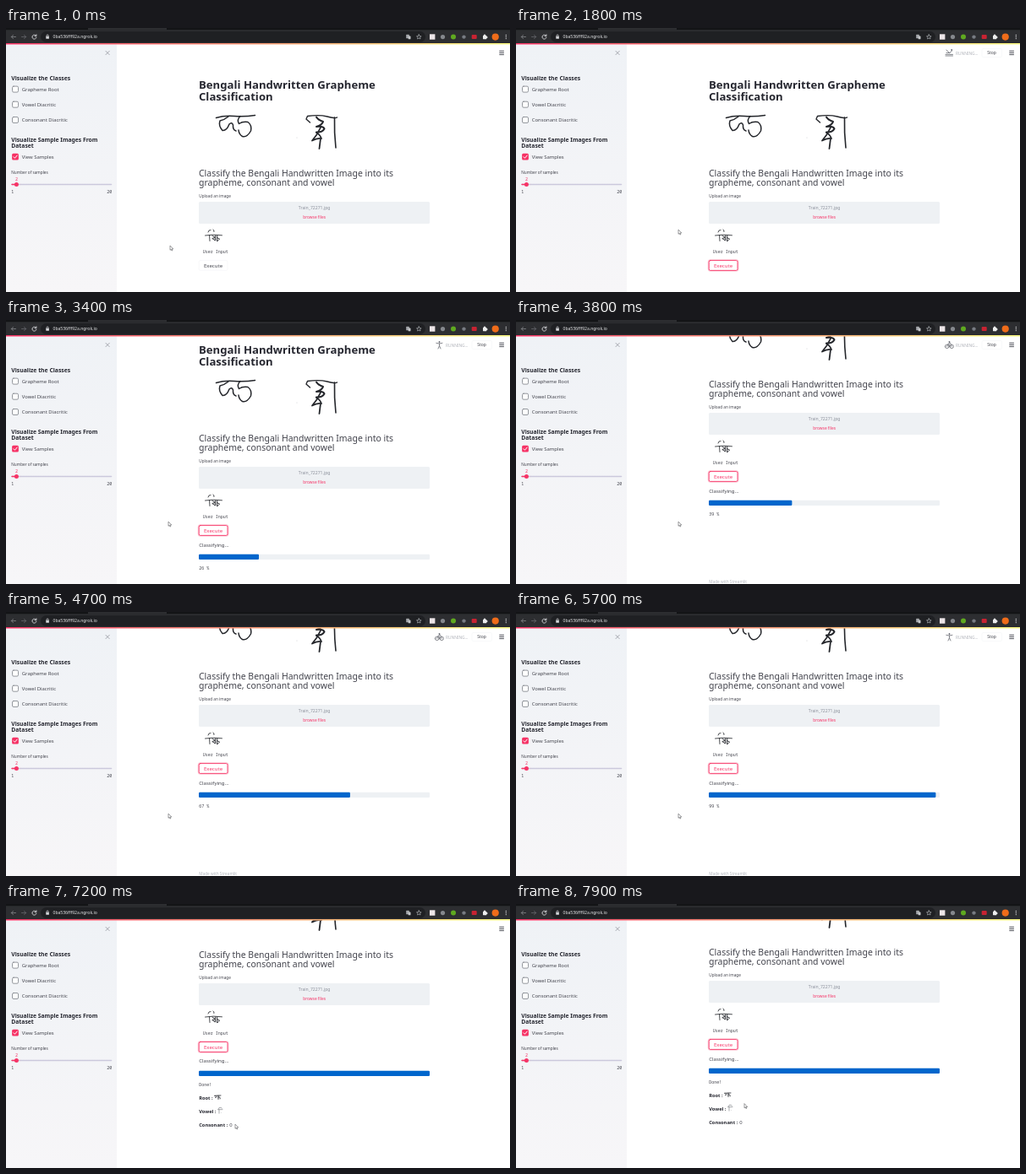
An HTML page with a canvas for the animation above (8000 ms loop, 596x313 px).

```html
<!DOCTYPE html>
<html lang="en">
<head>
<meta charset="utf-8">
<title>Grapheme classification demo</title>
<style>
  html, body { margin: 0; width: 100%; height: 100%; overflow: hidden; background: #fff; }
  canvas { display: block; width: 596px; height: 313px; }
</style>
</head>
<body>
<canvas id="stage"></canvas>
<script>
const W = 596, H = 313, LOOP = 8000;
const INK = '#262730', SOFT = '#43444d', PINK = '#f63366', GREY = '#8c919c', PALE = '#eef1f4', BLUE = '#0066cc';
const SANS = '"Noto Sans", sans-serif', MONO = '"Noto Sans Mono", monospace';

const canvas = document.getElementById('stage');
const ctx = canvas.getContext('2d');
const dpr = window.devicePixelRatio || 1;
canvas.width = W * dpr;
canvas.height = H * dpr;

// Keyframes are [time, value] pairs
const SCROLL = [[3100, 0], [3300, 32], [3440, 32], [3600, 66], [3780, 96],
  [6950, 96], [7080, 106], [7200, 112], [7400, 115]];
const MOUSE_X = [[250, 194], [1000, 249], [1350, 249], [1750, 192],
  [6350, 192], [6750, 271], [7250, 271], [7800, 270]];
const MOUSE_Y = [[250, 258.5], [1000, 281], [1350, 281], [1750, 239.5],
  [6350, 239.5], [6750, 261.5], [7250, 261.5], [7800, 237]];
const FILL = [[2600, 0], [3400, .26], [3800, .36], [5700, .983], [5800, 1]];

function track(keys, t) {
  if (t <= keys[0][0]) return keys[0][1];
  for (let i = 1; i < keys.length; i++) {
    const [t0, a] = keys[i - 1], [t1, b] = keys[i];
    if (t < t1) return a + (b - a) * (t - t0) / (t1 - t0);
  }
  return keys[keys.length - 1][1];
}

function text(str, x, y, size, color = INK, weight = 400, family = SANS, align = 'left') {
  ctx.font = `${weight} ${size}px ${family}`;
  ctx.fillStyle = color;
  ctx.textAlign = align;
  ctx.fillText(str, x, y);
}

function rect(x, y, w, h, color, r = 0) {
  ctx.fillStyle = color;
  ctx.beginPath();
  ctx.roundRect(x, y, w, h, r);
  ctx.fill();
}

function outline(x, y, w, h, color, r, width = 1) {
  ctx.strokeStyle = color;
  ctx.lineWidth = width;
  ctx.beginPath();
  ctx.roundRect(x, y, w, h, r);
  ctx.stroke();
}

function dot(x, y, r, color) {
  ctx.fillStyle = color;
  ctx.beginPath();
  ctx.arc(x, y, r, 0, 7);
  ctx.fill();
}

function stroke(d, color, width = 1) {
  ctx.strokeStyle = color;
  ctx.lineWidth = width;
  ctx.lineCap = ctx.lineJoin = 'round';
  ctx.stroke(new Path2D(d));
}

function browser() {
  rect(0, 0, W, 18, '#2d2e31');
  rect(0, 0, W, 2.2, '#131416');
  rect(97, 0, 93, 2.2, '#2d2e31');
  rect(41, 4, 455, 13, '#1f2023', 6.5);
  stroke('M11.5 10.5H6.5M8.5 8.3L6.3 10.5L8.5 12.7', '#85878b', .8);
  stroke('M18.5 10.5H23.5M21.5 8.3L23.7 10.5L21.5 12.7', '#66686c', .8);
  stroke('M35.4 9A2.5 2.5 0 1 0 35.9 11.3M35.9 7.8V9.7H34', '#dcdde0', .9);
  rect(47.3, 9.8, 3.6, 3, '#d4d5d8', .4);
  stroke('M48 9.8V9A1.1 1.1 0 0 1 50.2 9V9.8', '#d4d5d8', .7);
  text('0ba536fff92a.ngrok.io', 55.5, 12.4, 5.05, '#e4e5e7');

  rect(473.2, 7.8, 3.6, 4.4, '#a3a5a9', .5);
  rect(475.7, 9.4, 2.8, 3.8, '#c4c6c9', .5);
  stroke('M488.3 7.7L489.1 9.6L491.1 9.8L489.6 11.1L490 13L488.3 12L486.6 13L487 11.1L485.5 9.8L487.5 9.6Z', '#c2c4c8', .6);
  rect(501, 7.3, 6.4, 6.4, '#ece5e7');
  dot(516.5, 10.6, 2.6, '#85888d');
  dot(529, 10.6, 3, '#5fa920');
  dot(541.5, 10.6, 2.2, '#777b82');
  rect(550.7, 8, 6, 5, '#c82332', 1);
  rect(564, 8.8, 4.4, 4.4, '#eceded', .6);
  dot(566, 8.5, 1.1, '#eceded');
  dot(568.5, 11, 1.1, '#eceded');
  dot(578.7, 10.6, 4.1, '#ef6c1a');
  for (const y of [8.4, 10.5, 12.6]) dot(591.3, y, .65, '#d8d9dc');

  const g = ctx.createLinearGradient(0, 0, W, 0);
  g.addColorStop(0, PINK);
  g.addColorStop(1, '#fffd80');
  rect(0, 18, W, 1.6, g);
}

function checkbox(label, y, on) {
  if (on) {
    rect(7.1, y - 3.9, 7.8, 7.8, PINK, 1.5);
    stroke(`M9 ${y + .1}L10.5 ${y + 1.6}L13.2 ${y - 1.7}`, '#fff', 1);
  } else {
    rect(7.5, y - 3.5, 7, 7, '#fff', 1.5);
    outline(7.5, y - 3.5, 7, 7, '#7d8088', 1.5, .8);
  }
  text(label, 18.8, y + 2.2, 5.9, SOFT);
}

function sidebar() {
  const g = ctx.createLinearGradient(0, 18, 0, H);
  g.addColorStop(0, '#eff2f6');
  g.addColorStop(1, '#f7f6f8');
  rect(0, 18, 131, H - 18, g);
  stroke('M118 27.4L122.2 31.6M122.2 27.4L118 31.6', '#92959d', .8);
  text('Visualize the Classes', 6.3, 62, 6.84, INK, 700);
  checkbox('Grapheme Root', 72.6);
  checkbox('Vowel Diacritic', 90.7);
  checkbox('Consonant Diacritic', 109);
  text('Visualize Sample Images From', 6.3, 135, 6.75, INK, 700);
  text('Dataset', 6.3, 142.2, 6.75, INK, 700);
  checkbox('View Samples', 152.7, true);
  text('Number of samples', 6.3, 173.2, 4.7, SOFT);
  text('2', 12.4, 180.5, 5, PINK, 400, MONO, 'center');
  rect(6.3, 184.7, 119, 1.5, '#cbc8dc', .7);
  rect(6.3, 184.7, 6.2, 1.5, PINK, .7);
  dot(12.4, 185.5, 2.5, PINK);
  text('1', 6.2, 195.6, 5, SOFT, 400, MONO);
  text('20', 125.2, 195.6, 5, SOFT, 400, MONO, 'right');
}

// Handwritten characters
function samples() {
  const ink = '#24262b';
  stroke('M248.5 106.5Q258 103.5 270 104.5T294.5 103.5', ink, 1.5);
  stroke('M263 105Q258 109 253 110Q251 116 256 121.5Q261 122 264 114Q267 111 268.5 115Q268 121 272 122', ink, 1.5);
  stroke('M277 104.5Q272.5 109 275.5 113.5Q280 110.5 286 111.5Q291 115 289.5 122Q285 130 279.5 128.5Q275.5 126 275 121', ink, 1.5);
  stroke('M359.5 112L355 108L356.5 104.5Q370 102.5 380 105T391.5 106', ink, 1.4);
  stroke('M388.5 106Q388 124 390 142', ink, 1.6);
  stroke('M367 105.5Q369 109 375 111Q374 115 367 117Q375 116 376.5 119.5Q374 124 367 123.5', ink, 2);
  stroke('M372 118Q368 127 362 133.5Q368 130 373 131Q371 126 367 124M372 131L370.5 143', ink, 1.8);
  dot(344, 130, .5, '#c4c6ca');
}

function inputGlyph() {
  const ink = '#35373c';
  stroke('M235.5 246Q245 244.3 255.5 245.8', ink, .9);
  stroke('M240.5 245.5L241 252.5M239 242Q239.5 239 242 239.5M245 239Q246.5 239.5 246 241.5', ink, .9);
  stroke('M244 246L247.3 248.5L243.8 249.5L247.5 252V246M249.5 246V252.5M249.5 248.5L252.5 250L250 252.8', ink, 1);
}

function button(hot, focus) {
  if (focus) outline(227.9, 275.4, 34.4, 12.2, 'rgba(246,51,102,.25)', 2, 2.4);
  rect(228.2, 275.6, 33.8, 11.8, '#fff', 1.6);
  outline(228.2, 275.6, 33.8, 11.8, hot ? PINK : '#f3f4f6', 1.6, hot ? .9 : .6);
  text('Execute', 245, 283.6, 6.05, hot ? PINK : SOFT, 400, SANS, 'center');
}

function results() {
  text('Done!', 228.2, 328.2, 5, SOFT, 400, MONO);
  text('Root :', 228.2, 343.7, 5.75, INK, 700);
  stroke('M246.5 339.3L254 339M248 339.5Q250 342 247.5 341.5M251 339.2V343.5M251 341Q254 340.5 253.2 343', '#33353a', .9);
  text('Vowel :', 228.2, 359.9, 5.75, INK, 700);
  stroke('M250.5 355.7H256M252 355.7V360.2M251.3 355Q251.5 352.5 254 353.3L255.3 354.2', '#85878c', .7);
  dot(254.5, 359.3, .4, '#a0a2a7');
  text('Consonant :', 228.2, 376.2, 5.75, INK, 700);
  text('0', 264.3, 376.2, 5.9, SOFT);
}

function page(t) {
  ctx.save();
  ctx.beginPath();
  ctx.rect(131, 18, W - 131, H - 18);
  ctx.clip();
  ctx.translate(0, -track(SCROLL, t));
  text('Bengali Handwritten Grapheme', 228, 71.7, 13.15, INK, 700);
  text('Classification', 228, 85.9, 13.15, INK, 700);
  samples();
  text('Classify the Bengali Handwritten Image into its', 228, 175.6, 10.46, SOFT);
  text('grapheme, consonant and vowel', 228, 186.6, 10.46, SOFT);
  text('Upload an image', 228.2, 201, 4.72, SOFT);
  rect(228, 206, 273, 26, PALE, 1.5);
  text('Train_72271.jpg', 364.6, 215.4, 5.08, GREY, 400, SANS, 'center');
  text('browse files', 364.6, 226, 4.8, PINK, 400, SANS, 'center');
  inputGlyph();
  text('User Input', 232.8, 267.2, 5, SOFT, 400, MONO);
  button(t >= 850, t >= 1200);

  const done = t >= 5850;
  if (t >= 2200) text('Classifying...', 228.2, 300.5, 6.05, SOFT);
  if (t >= 2850) {
    rect(228, 309.7, 273, 6.3, PALE, 1.2);
    rect(228, 309.7, 273 * track(FILL, t), 6.3, BLUE, 1.2);
    const percent = Math.min(100, Math.floor(39.2 + (t - 3800) * .0316));
    if (!done) text(percent + ' %', 228.2, 328.2, 5, SOFT, 400, MONO);
  }
  if (done) results();
  text('Made with Streamlit', 228.2, done ? 460 : 407.8, 4.76, '#b3b6bd');
  ctx.restore();
}

const POSES = {
  s: 'M508.8 27.3L512.3 28H512.7L516 27.3M512.5 28V30.7L511 34M512.5 30.7L514 34',
  b: 'M507.4 31.4a2.2 2.2 0 1 0 4.4 0a2.2 2.2 0 1 0 -4.4 0M513 31.4a2.2 2.2 0 1 0 4.4 0a2.2 2.2 0 1 0 -4.4 0M509.6 31.4L511 28.4L513 30L512.2 32M511 28.4L513.6 27.3L515.3 31.4',
  w: 'M508 31.4H516.5M508 33H516.5M509 26L512.5 29.5L515.5 27.2M509 29.5H513',
  r: 'M512.8 27.3L511.5 30.5L513.8 32L513 34M511.5 30.5L510 32.6L508 32.5M509.5 29L512.5 28L515.5 29.3'
};
const SEQUENCE = 'sbwrsbsrbws';

function status(t) {
  for (const y of [27.2, 29.4, 31.6]) rect(583.3, y - .45, 5.6, .95, '#454750');
  if (t < 1300 || t >= 6100) return;
  const pose = SEQUENCE[Math.floor(t / 200) % SEQUENCE.length];
  stroke(POSES[pose], '#676a72', .8);
  dot(pose === 'w' ? 515.2 : 512.5, 26, .95, '#676a72');
  text('RUNNING...', 520, 31.5, 4.8, '#b0b3ba');
  outline(551, 24.5, 23.5, 10, '#f4f5f7', 1.5, .6);
  text('Stop', 562.6, 31.2, 4.95, SOFT, 400, SANS, 'center');
}

function pointer(t) {
  ctx.save();
  ctx.translate(track(MOUSE_X, t), track(MOUSE_Y, t));
  const arrow = new Path2D('M0 0V4.8L1.2 3.8L2 5.6L2.8 5.2L2 3.5H3.4Z');
  ctx.fillStyle = '#fff';
  ctx.fill(arrow);
  ctx.strokeStyle = '#4a4b50';
  ctx.lineWidth = .55;
  ctx.stroke(arrow);
  ctx.restore();
}

function draw(now) {
  const t = now % LOOP;
  ctx.setTransform(dpr, 0, 0, dpr, 0, 0);
  rect(0, 0, W, H, '#fff');
  page(t);
  sidebar();
  browser();
  status(t);
  pointer(t);
}

const start = performance.now();
function tick() {
  draw(performance.now() - start);
  requestAnimationFrame(tick);
}
tick();
</script>
</body>
</html>
```
